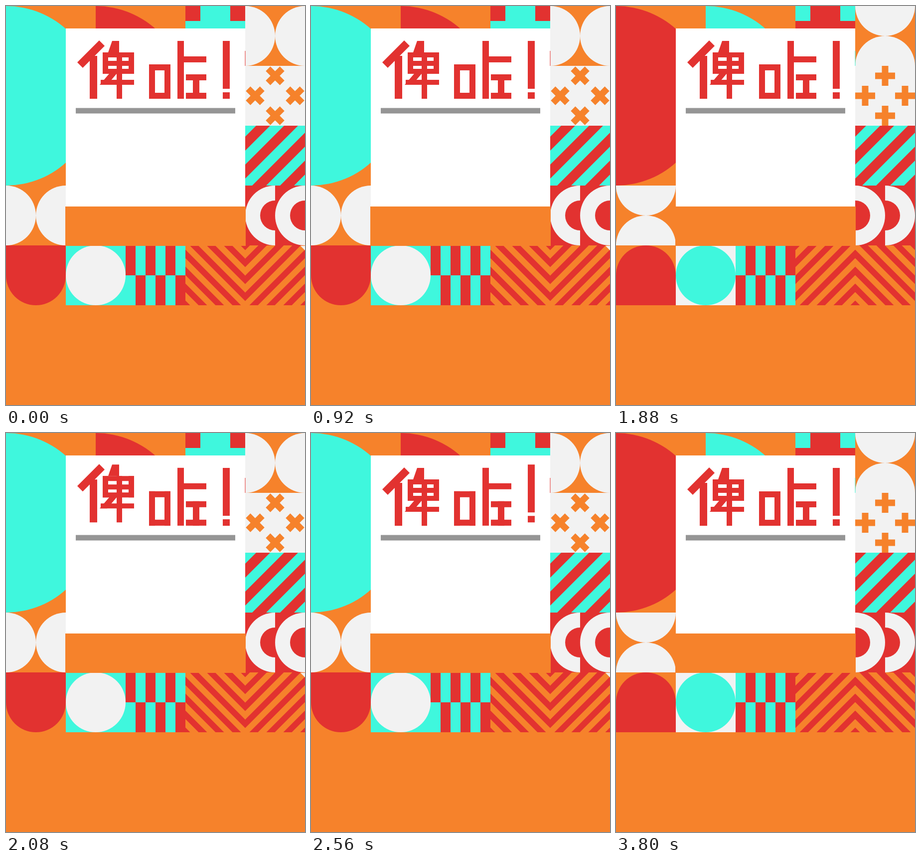
Animation of 600x800 px, one loop 3840 ms. Source, as an HTML page with a canvas:

```html
<!DOCTYPE html>
<html lang="zh">
<head>
<meta charset="utf-8">
<style>
  html, body { margin: 0; width: 100%; height: 100%; overflow: hidden; background: #f6822b; }
  canvas { display: block; }
</style>
</head>
<body>
<canvas id="stage" width="600" height="800"></canvas>
<script>
const LOOP = 3840, FLIP = 960;
const ORANGE = '#f6822b', TEAL = '#3ff7dd', RED = '#e23230', LIGHT = '#f2f2f2';
const ctx = document.getElementById('stage').getContext('2d');

function rect(color, x, y, w, h) {
  ctx.fillStyle = color;
  ctx.fillRect(x, y, w, h);
}

function poly(color, ...points) {
  ctx.fillStyle = color;
  ctx.beginPath();
  for (let i = 0; i < points.length; i += 2) ctx.lineTo(points[i], points[i + 1]);
  ctx.fill();
}

// Circular segment; start and sweep are in quarter turns
function arc(color, x, y, r, start = 0, sweep = 4) {
  ctx.fillStyle = color;
  ctx.beginPath();
  ctx.arc(x, y, r, start * Math.PI / 2, (start + sweep) * Math.PI / 2);
  ctx.fill();
}

// Runs draw in a clipped 120 px cell, turned by quarter turns about its centre
function cell(x, y, bg, turns, draw) {
  ctx.save();
  ctx.translate(x + 60, y + 60);
  ctx.rotate(turns * Math.PI / 2);
  ctx.translate(-60, -60);
  ctx.beginPath();
  ctx.rect(0, 0, 120, 120);
  ctx.clip();
  rect(bg, 0, 0, 120, 120);
  draw();
  ctx.restore();
}

// Rising diagonal bands, mirrored about the cell's main diagonal
function stripes(color, width) {
  for (let u = 120 + width / 2 - 8 * width; u < 240; u += 2 * width)
    poly(color, u, 0, u + width, 0, 0, u + width, 0, u);
}

function facingHalves() {
  arc(LIGHT, 0, 60, 60, -1, 2);
  arc(LIGHT, 120, 60, 60, 1, 2);
}

function halfRings() {
  for (const x of [60, 120]) {
    arc(LIGHT, x, 60, 60, 1, 2);
    arc(RED, x, 60, 30, 1, 2);
  }
}

function crosses(angle) {
  for (const [x, y] of [[60, 20], [20, 60], [100, 60], [60, 100]]) {
    ctx.save();
    ctx.translate(x, y);
    ctx.rotate(angle);
    rect(ORANGE, -20, -6.5, 40, 13);
    rect(ORANGE, -6.5, -20, 13, 40);
    ctx.restore();
  }
}

function pattern(flipped) {
  const turn = flipped ? 1 : 0;
  const [main, accent] = flipped ? [RED, TEAL] : [TEAL, RED];

  arc(main, 0, 180, 180, -1, 2);
  poly(accent, 180, 180);
  ctx.fillStyle = accent;
  ctx.beginPath();
  ctx.moveTo(180, 180);
  ctx.arc(180, 180, 180, -Math.PI / 2, 0);
  ctx.fill();

  cell(360, 0, main, 0, () => {
    rect(accent, 0, 0, 30, 30);
    rect(accent, 90, 0, 30, 30);
  });
  cell(480, 0, ORANGE, turn, facingHalves);
  cell(480, 120, LIGHT, 0, () => crosses(flipped ? 0 : Math.PI / 4));
  cell(480, 240, main, 0, () => stripes(accent, 28));
  cell(480, 360, RED, 2 * turn, halfRings);
  cell(0, 360, ORANGE, turn, facingHalves);
  cell(0, 480, ORANGE, 2 * turn, () => {
    rect(RED, 0, 0, 120, 60);
    arc(RED, 60, 60, 60, 0, 2);
  });
  cell(120, 480, flipped ? LIGHT : TEAL, 0, () => arc(flipped ? TEAL : LIGHT, 60, 60, 60));
  cell(240, 480, main, 0, () => {
    for (let i = 0; i < 6; i++) rect(accent, i * 20, i % 2 * 60, 20, 60);
  });
  cell(360, 480, ORANGE, 1 - turn, () => stripes(RED, 17));
  cell(480, 480, ORANGE, turn, () => stripes(RED, 17));
  if (!flipped) poly(LIGHT, 591, 481, 600, 481, 600, 490);
}

const glyphs = [
  () => {
    poly(RED, 187, 69, 198, 80, 154, 124, 143, 113);
    rect(RED, 168, 100, 15, 86);
    poly(RED, 213, 70, 227, 70, 227, 93, 205, 93);
    for (const x of [194, 246]) rect(RED, x, 93, 11, 43);
    for (const y of [93, 110, 126]) rect(RED, 194, y, 63, 10);
    rect(RED, 222, 93, 11, 93);
    poly(RED, 212, 130, 227, 130, 203, 158, 188, 158);
    rect(RED, 190, 148, 67, 10);
  },
  () => {
    for (const x of [287, 318]) rect(RED, x, 117, 12, 69);
    for (const y of [117, 174]) rect(RED, 287, y, 43, 12);
    rect(RED, 344, 70, 13, 116);
    rect(RED, 357, 101, 45, 12);
    rect(RED, 361, 137, 41, 12);
    rect(RED, 375, 137, 13, 49);
    rect(RED, 361, 174, 41, 12);
  },
  () => {
    rect(RED, 435, 70, 14, 96);
    rect(RED, 435, 173, 14, 13);
  }
];

// Three waves of smooth hops, each glyph a little later than the one before
const HOP = { start: 85, every: 933, count: 3, stagger: 110, length: 520, height: 13.5 };

function lift(t, index) {
  const local = t - HOP.start - index * HOP.stagger;
  const wave = Math.floor(local / HOP.every);
  const phase = (local - wave * HOP.every) / HOP.length;
  if (wave < 0 || wave >= HOP.count || phase > 1) return 0;
  return HOP.height * (1 - Math.cos(2 * Math.PI * phase)) / 2;
}

function render(t) {
  const flipped = Math.floor(t / FLIP) % 2 === 1;
  rect(ORANGE, 0, 0, 600, 800);
  pattern(flipped);
  rect('#fff', 120, 45, 360, 357);
  rect(ORANGE, 119, 402, 362, 79);
  rect(flipped ? TEAL : RED, 479.5, 90, 1, 30);
  rect('#959595', 140, 204.5, 320, 11);
  glyphs.forEach((draw, i) => {
    ctx.save();
    ctx.translate(0, -lift(t, i));
    draw();
    ctx.restore();
  });
}

function tick() {
  render(performance.now() % LOOP);
  requestAnimationFrame(tick);
}
tick();
</script>
</body>
</html>
```
